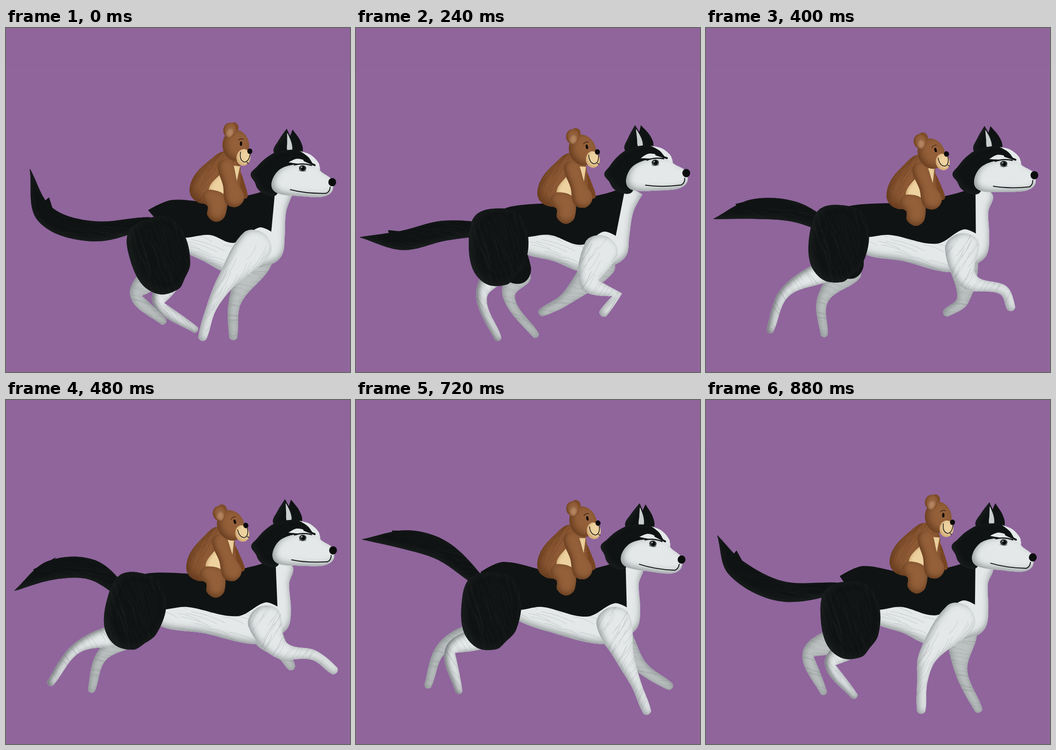
These frames come from a looping animation (748 by 748 pixels, 960 ms). An HTML page with a canvas:

```html
<!DOCTYPE html>
<html lang="en">
<head>
<meta charset="utf-8">
<title>Bear riding a running dog</title>
<style>
html, body { margin: 0; width: 100%; height: 100%; overflow: hidden; background: #8f659c; }
canvas { display: block; }
</style>
</head>
<body>
<canvas id="stage" width="748" height="748"></canvas>
<script>
const ctx = document.getElementById('stage').getContext('2d');
const STEP = 80, STEPS = 12;
const KEYS = [0, 1, 3, 5, 7, 9, 11];
const BLACK = '#101313', WHITE = '#e4e8e9', FAR = '#bcc1c1', BROWN = '#8e5a35', CREAM = '#edd2a0';
const SHADE = 'rgba(80,88,90,.55)', DEEP = 'rgba(60,66,68,.8)', GLOSS = 'rgba(60,70,68,.25)';
const BROWN_SHADE = 'rgba(75,38,14,.65)', CREAM_SHADE = 'rgba(170,110,50,.5)';

// Joints of the skeleton in each key pose.
const rig = {
  // centre x, y, turn, height of the back
  haunch: [[333,485,-21,374], [333,500,-25,378], [311,467,-4,388], [290,460,3,386], [281,443,15,366], [295,450,0,352], [315,469,-8,361]],
  chest: [[0,0], [0,4], [-12,9], [10,4], [14,9], [12,8], [8,2]],
  // shift x, turn
  dogHead: [[-1,3], [0,0], [7,-3.4], [3,-1.9], [-2,2.8], [-1,6.8], [1,5.3]],
  // shift x, y, turn
  bearHead: [[3,0,3], [0,0,0], [-6,7,-12], [-9,14,-18], [-11,11,-19], [-5,6,-14], [8,-1,0]],
  // two bends, tip
  tail: [[190,442,85,405,52,307], [190,510,78,475,37,391], [190,441,100,462,9,455], [190,399,100,394,17,415],
    [185,343,95,350,19,406], [190,329,110,304,14,303], [165,416,65,365,25,295]],
  // hock, toe
  nearHind: [[333,601,412,656], [378,628,463,667], [273,587,309,675], [172,575,139,658], [155,510,91,583], [205,544,224,634], [270,575,323,644]],
  // hip, hock, toe
  farHind: [[325,535,283,583,343,639], [398,543,348,604,444,627], [356,535,333,587,391,668], [316,525,254,590,257,667],
    [245,490,172,528,134,599], [262,510,187,540,156,622], [285,520,222,553,256,636]],
  // elbow, wrist, toe
  nearFront: [[478,552,446,610,427,674], [472,518,455,570,402,595], [508,557,568,580,537,621], [572,550,646,570,664,609],
    [612,540,675,550,736,582], [585,562,610,620,633,678], [482,558,470,615,468,676]],
  // wrist, toe
  farFront: [[498,595,494,673], [470,565,407,597], [455,590,403,619], [558,592,522,620], [640,528,703,552], [622,582,683,623], [555,590,593,674]]
};

// Value of a joint row at a step; steps between two keys lie on a smooth curve.
function at(poses, step) {
  const n = KEYS.length;
  const i = KEYS.findLastIndex(k => k <= step);
  if (KEYS[i] === step) return poses[i];
  const key = j => KEYS[(j + n) % n] + STEPS * Math.floor(j / n);
  const pose = j => poses[(j + n) % n];
  const span = key(i + 1) - key(i);
  return pose(i).map((a, c) => {
    const b = pose(i + 1)[c];
    const slopeA = (b - pose(i - 1)[c]) / (key(i + 1) - key(i - 1));
    const slopeB = (pose(i + 2)[c] - a) / (key(i + 2) - key(i));
    return (a + b) / 2 + span * (slopeA - slopeB) / 8;
  });
}

const pairs = p => Array.from({ length: p.length / 2 }, (_, i) => [p[2 * i], p[2 * i + 1]]);

function rotate([x, y], deg) {
  const a = deg * Math.PI / 180;
  return [x * Math.cos(a) - y * Math.sin(a), x * Math.sin(a) + y * Math.cos(a)];
}

// Closed curve through the points; sharp turns stay corners.
function outline(points) {
  const n = points.length, path = new Path2D();
  const pt = i => points[(i + n) % n];
  const handle = (i, side) => {
    const [ax, ay] = pt(i - 1), [x, y] = pt(i), [bx, by] = pt(i + 1);
    if ((x - ax) * (bx - x) + (y - ay) * (by - y) < 0) return [x, y];
    const [fx, fy] = pt(i + side);
    const k = side * .33 * Math.hypot(fx - x, fy - y) / Math.hypot(bx - ax, by - ay);
    return [x + (bx - ax) * k, y + (by - ay) * k];
  };
  path.moveTo(...pt(0));
  for (let i = 0; i < n; i++) path.bezierCurveTo(...handle(i, 1), ...handle(i + 1, -1), ...pt(i + 1));
  path.closePath();
  return path;
}

// Rounded limb along joints with a width at each joint.
function limb(joints, widths) {
  const last = joints.length - 1, left = [], right = [];
  const heading = i => Math.atan2(joints[i + 1][1] - joints[i][1], joints[i + 1][0] - joints[i][0]);
  const cap = (i, angle, side) => {
    const r = side * .35 * widths[i];
    return [joints[i][0] + r * Math.cos(angle), joints[i][1] + r * Math.sin(angle)];
  };
  joints.forEach(([x, y], i) => {
    const a = heading(Math.max(i - 1, 0)), b = heading(Math.min(i, last - 1));
    const mid = Math.atan2(Math.sin(a) + Math.sin(b), Math.cos(a) + Math.cos(b));
    const dx = -Math.sin(mid) * widths[i] / 2, dy = Math.cos(mid) * widths[i] / 2;
    left.push([x + dx, y + dy]);
    right.unshift([x - dx, y - dy]);
  });
  return outline([...left, cap(last, heading(last - 1), 1), ...right, cap(0, heading(0), -1)]);
}

function oval(x, y, rx, ry, turn = 0) {
  const path = new Path2D();
  path.ellipse(x, y, rx, ry, turn, 0, 7);
  return path;
}

// Fill with a soft inner shadow on the side away from (dx, dy).
function paint(path, fill, shade, dx = 0, dy = 0, blur = 14) {
  ctx.fillStyle = fill;
  ctx.fill(path);
  if (!shade) return;
  ctx.save();
  ctx.clip(path);
  const frame = new Path2D();
  frame.rect(-200, -200, 1200, 1200);
  frame.addPath(path);
  Object.assign(ctx, { shadowColor: shade, shadowBlur: blur, shadowOffsetX: dx, shadowOffsetY: dy });
  ctx.fill(frame, 'evenodd');
  ctx.restore();
}

// Fine brush hairs inside a shape.
function hairs(path, color, [x, y], turn, count = 60, reach = 90) {
  let seed = 7;
  const rnd = () => (seed = seed * 16807 % 2147483647) / 2147483647;
  ctx.save();
  ctx.clip(path);
  ctx.translate(x, y);
  ctx.rotate(turn);
  ctx.strokeStyle = color;
  ctx.lineWidth = 1;
  ctx.beginPath();
  for (let i = 0; i < count; i++) {
    const hx = (rnd() * 2 - 1.3) * reach, hy = (rnd() * 2 - 1) * reach, len = 30 + rnd() * 50;
    ctx.moveTo(hx, hy);
    ctx.quadraticCurveTo(hx + len / 2, hy - 5, hx + len, hy + 2);
  }
  ctx.stroke();
  ctx.restore();
}

function line(d, width, color = BLACK) {
  ctx.strokeStyle = color;
  ctx.lineWidth = width;
  ctx.lineCap = 'round';
  ctx.stroke(new Path2D(d));
}

function rigid(px, py, [dx, dy, deg], draw) {
  ctx.save();
  ctx.translate(px + dx, py + dy);
  ctx.rotate(deg * Math.PI / 180);
  ctx.translate(-px, -py);
  draw();
  ctx.restore();
}

const haunchShape = pairs([-10,-75, -48,-62, -64,-20, -62,50, -33,88, 10,92, 30,76, 53,50, 64,-10, 45,-62]);
const hood = outline(pairs([533,319, 545,303, 560,286, 582,270, 605,263, 638,262, 656,274, 672,292,
  640,300, 600,345, 588,363, 565,361, 550,350, 543,336]));
const face = outline(pairs([580,332, 592,309, 612,297, 640,292, 681,294, 684,304, 710,322,
  713,343, 704,355, 685,361, 640,361, 600,359, 583,350]));
const forehead = outline(pairs([637,263, 661,270, 680,288, 681,300, 670,293, 656,275]));
const brow = outline(pairs([614,289, 632,280, 655,285, 664,291, 640,291]));
const bearTorso = outline(pairs([474,268, 438,290, 409,320, 398,350, 404,370, 425,382, 465,380, 502,372, 508,320, 504,290]));
const bearBelly = outline(pairs([466,316, 440,352, 462,368, 477,378, 494,360, 502,325, 507,300, 486,300]));

function drawDogHead() {
  paint(limb([[625,265], [624,243], [619,218]], [36, 27, 1]), BLACK);
  paint(limb([[602,270], [605,245], [606,217]], [44, 32, 1]), BLACK, GLOSS, 3, 2);
  paint(limb([[615,262], [613,245], [608,226]], [11, 9, 1]), '#c9cecf');
  paint(hood, BLACK, GLOSS, 4, -3);
  paint(face, WHITE, SHADE, 5, -4);
  paint(forehead, WHITE);
  paint(brow, WHITE);
  line('M627 294Q645 288 664 293', 2.5);
  line('M648 283L671 292', 4);
  paint(oval(645, 300, 8, 6.5), '#34393a');
  paint(oval(646, 300, 4, 5), '#080a0a');
  paint(oval(643, 298, 1.4, 1.2), '#dfe3e4');
  line('M637 305Q645 309 653 305', 1, '#555b5c');
  line('M621 348Q655 355 699 352Q707 348 707 338', 2);
  paint(oval(711, 327, 8.5, 9), '#0b0d0d');
}

function drawBearBody() {
  paint(limb([[500,312], [510,340], [519,366]], [14, 16, 12]), '#784522');
  paint(bearTorso, BROWN, BROWN_SHADE, 7, -6, 22);
  hairs(bearTorso, 'rgba(80,42,18,.25)', [430, 330], -1, 60, 60);
  paint(bearBelly, CREAM, CREAM_SHADE, 2, -2, 7);
  paint(limb([[437,366], [457,377], [457,408]], [32, 44, 38]), '#93603a', BROWN_SHADE, 2, -4);
  paint(limb([[474,296], [486,338], [497,374]], [32, 32, 42]), '#94603a', BROWN_SHADE, 4, -3, 12);
}

function drawBearHead() {
  paint(oval(491, 217, 10, 11, -.2), '#7d4c28');
  paint(oval(497, 256, 29, 34, -.15), '#94603a', BROWN_SHADE, 6, -4, 16);
  paint(oval(482, 223, 14, 16, .2), '#945f39', BROWN_SHADE, 2, -1, 7);
  paint(oval(482, 228, 8.5, 11, .3), '#b68560', BROWN_SHADE, 1, 1, 6);
  paint(oval(515, 281, 15, 18, .1), CREAM, CREAM_SHADE, 3, -3, 8);
  paint(oval(528, 267, 5.5, 6), '#0a0a0a');
  paint(oval(508, 251.5, 2.6, 5), '#120c08');
  line('M502 244Q507 239 513 242', 1.2, '#2a170b');
  line('M508 270Q506 288 517 291Q527 290 529 274M523 291L526 294', 1.5);
}

function drawTail(joints) {
  const [, , [x, y], [tx, ty]] = joints;
  const path = limb(joints, [22, 44, 42, 1]);
  const len = Math.hypot(tx - x, ty - y), dx = (tx - x) / len, dy = (ty - y) / len;
  const beside = (along, out) => [x + dx * along - dy * out, y + dy * along + dx * out];
  paint(path, BLACK, GLOSS, 0, -5);
  hairs(path, 'rgba(70,80,78,.14)', joints[1], .2);
  paint(outline([beside(-25, 19), beside(32, 20), beside(22, 5)]), BLACK);
}

function drawLeg(joints, widths, fill, shade, dx, dy, turn) {
  const path = limb(joints, widths);
  paint(path, fill, shade, dx, dy);
  hairs(path, 'rgba(95,103,105,.2)', joints[1], turn, 70);
}

function draw(step) {
  const pose = name => at(rig[name], step);
  const [cx, cy, turn, back] = pose('haunch');
  const [u, v] = pose('chest');
  const [headX, headTurn] = pose('dogHead');
  const [bearX, bearY, bearTurn] = pose('bearHead');
  const nearFront = pairs(pose('nearFront')), farHind = pairs(pose('farHind'));
  const fromHaunch = (point, deg) => {
    const [x, y] = rotate(point, deg);
    return [cx + x, cy + y];
  };
  const bellyX = (nearFront[0][0] + 490) / 2;
  const haunch = outline(haunchShape.map(p => fromHaunch(p, turn)));
  const torso = outline([[586, 350], [623, 362], [609 + u / 2, 400], [606 + u, 455], [601 + u, 492], [580 + u, 512],
    [bellyX, 531], [430, 507], [cx + 45, cy + 22 + turn * 1.4], [cx + 30, 435], [470, 415]]);
  const saddle = outline([[cx - 24, back + 22], [cx + 27, back], [450, 378], [543, 360], [586, 345], [577 + u, 443 + v],
    [550 + u, 434 + v], [496 + u / 2, 467 + v / 2], [cx + 110, 450], [cx + 40, 453]]);

  ctx.fillStyle = '#8f659c';
  ctx.fillRect(0, 0, 748, 748);
  ctx.strokeStyle = '#946ca1';
  ctx.lineWidth = 1;
  ctx.strokeRect(.5, 93.5, 745, 700);

  drawTail([[cx - 20, back + 48], ...pairs(pose('tail'))]);
  drawLeg([[550 + u, 500 + v], ...pairs(pose('farFront'))], [62, 27, 17], FAR, SHADE, 2, 3, .1);
  drawLeg(farHind, [52, 25, 15], FAR, SHADE, 2, 3, .2);
  paint(limb([[cx, cy], farHind[0]], [80, 58]), BLACK);
  paint(torso, WHITE, SHADE, 0, -6);
  hairs(torso, 'rgba(110,118,120,.25)', [430, 507], .3);
  paint(saddle, BLACK);
  drawLeg([fromHaunch([-15, 65], turn * 1.6), ...pairs(pose('nearHind'))], [46, 23, 15], WHITE, DEEP, 5, 1, .9);
  paint(haunch, BLACK, GLOSS, 6, -3, 20);
  hairs(haunch, 'rgba(70,80,78,.15)', [cx, cy], 1.2, 80);
  drawLeg([[546 + u, 468 + v], ...nearFront], [74, 40, 22, 18], WHITE, SHADE, 5, -1, 2.1);

  rigid(534, 320, [headX, -1, headTurn], drawDogHead);
  rigid(455, 400, [bearX * .15, bearY * .65, bearTurn * .28], drawBearBody);
  rigid(508, 251, [bearX, bearY, bearTurn], drawBearHead);
}

let shown = -1;
function tick() {
  const step = Math.floor(performance.now() / STEP) % STEPS;
  if (step !== shown) draw(shown = step);
  requestAnimationFrame(tick);
}
tick();
</script>
</body>
</html>
```
